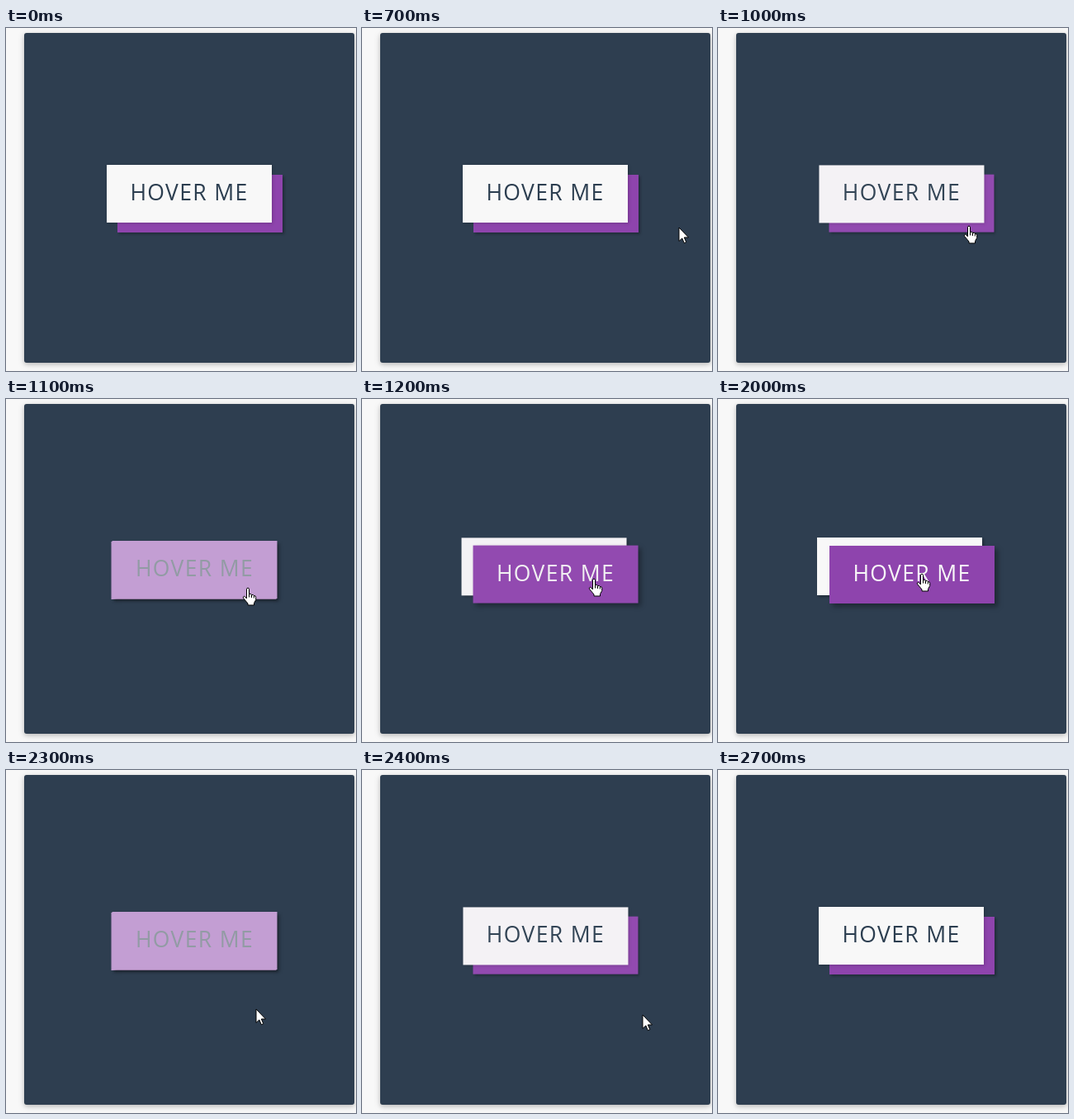
Recreate the animation shown at these times as an HTML page. Size 424 px wide and 416 px high, loop 3300 ms.

```html
<!DOCTYPE html>
<html lang="en">
<head>
<meta charset="utf-8">
<title>Hover button</title>
<style>
  html, body { margin: 0; width: 100%; height: 100%; overflow: hidden; background: #f8f8f8; }
  div, svg { position: absolute; left: 0; top: 0; }
  #card {
    left: 22px; top: 6px; width: 400px; height: 400px; border-radius: 3px; background: #2e3e50;
    box-shadow: 0 2px 5px rgba(0,0,0,.16), 0 2px 10px rgba(0,0,0,.12);
  }
  #back, #front { width: 200px; height: 70px; }
  #back { box-shadow: 2px 2px 3px rgba(0,0,0,.3); }
  #front svg { width: 200px; height: 70px; }
  text { font: 26.5px "Open Sans", "Noto Sans", sans-serif; letter-spacing: 1.36px; }
  #cursor { overflow: visible; width: 20px; height: 24px; }
  #cursor path { fill: #fff; stroke: #000; stroke-linejoin: round; }
</style>
</head>
<body>
<div id="card"></div>
<div id="back"></div>
<div id="front"><svg><text id="label" x="28.4" y="43">HOVER ME</text></svg></div>
<svg id="cursor">
  <path id="arrow" d="M0 0V16.5L3.8 13 6.3 18.8 8.8 17.7 6.3 12H11.5Z"/>
  <path id="hand" transform="translate(-6.5 -.5)" d="M5 13.5V2.2a1.5 1.5 0 0 1 3 0V8q2.5-1 3 1q2.4-.6 2.8 1q2.4-.2 2.4 2V15L14 19V21.5H6.5V19.5L1 13q-.6-2 1-2.2q1 0 3 2.7ZM8 8v4M11 9v3.5M13.8 10v3"/>
</svg>
<script>
const LOOP = 3300, STEP = 100, FADE = 300, ENTER = 950, LEAVE = 2150;
const LIGHT = [248, 248, 248], PURPLE = [142, 68, 173], NAVY = [44, 62, 80];
// Pointer keys: time, x, y
const PATH = [
  [700, 384, 242], [1000, 304, 240], [1200, 281, 218], [1500, 230, 186], [1700, 232, 190],
  [2000, 247, 212], [2100, 258, 240], [2200, 280, 281], [2300, 303, 290], [2400, 340, 297],
  [2600, 409, 301]
];
const $ = id => document.getElementById(id);
const clamp = x => Math.min(1, Math.max(0, x));
const smooth = x => x * x * x * (x * (6 * x - 15) + 10);
const mix = (a, b, p) => a + (b - a) * p;
const color = (a, b, p) => `rgb(${a.map((v, i) => Math.round(mix(v, b[i], p)))})`;
const place = (el, x, y) => { el.style.transform = `translate(${x}px,${y}px)`; };

function pointer(t) {
  const i = Math.max(1, PATH.findIndex(k => k[0] >= t));
  const [t0, x0, y0] = PATH[i - 1], [t1, x1, y1] = PATH[i];
  const p = clamp((t - t0) / (t1 - t0));
  return [Math.round(mix(x0, x1, p)), Math.round(mix(y0, y1, p))];
}

function draw(t) {
  const p = smooth(clamp((t - ENTER) / FADE)) - smooth(clamp((t - LEAVE) / FADE));
  place($('front'), mix(122, 135, p), mix(166, 178, p));
  place($('back'), mix(135, 120, p), mix(178, 168, p));
  $('front').style.background = color(LIGHT, PURPLE, p);
  $('back').style.background = color(PURPLE, LIGHT, p);
  $('label').style.fill = color(NAVY, LIGHT, p);
  const d = mix(1, 4, p);
  $('front').style.boxShadow = `${d}px ${d}px ${mix(4, 6, p)}px rgba(0,0,0,${mix(.2, .35, p)})`;

  const visible = t >= 700 && t < 2700, hovering = t >= 1000 && t < 2200;
  $('cursor').style.display = visible ? '' : 'none';
  $('hand').style.display = hovering ? '' : 'none';
  $('arrow').style.display = hovering ? 'none' : '';
  if (visible) place($('cursor'), ...pointer(t));
}

// The picture advances ten times a second.
function tick() {
  draw(Math.floor(performance.now() % LOOP / STEP) * STEP);
  requestAnimationFrame(tick);
}
tick();
</script>
</body>
</html>
```
